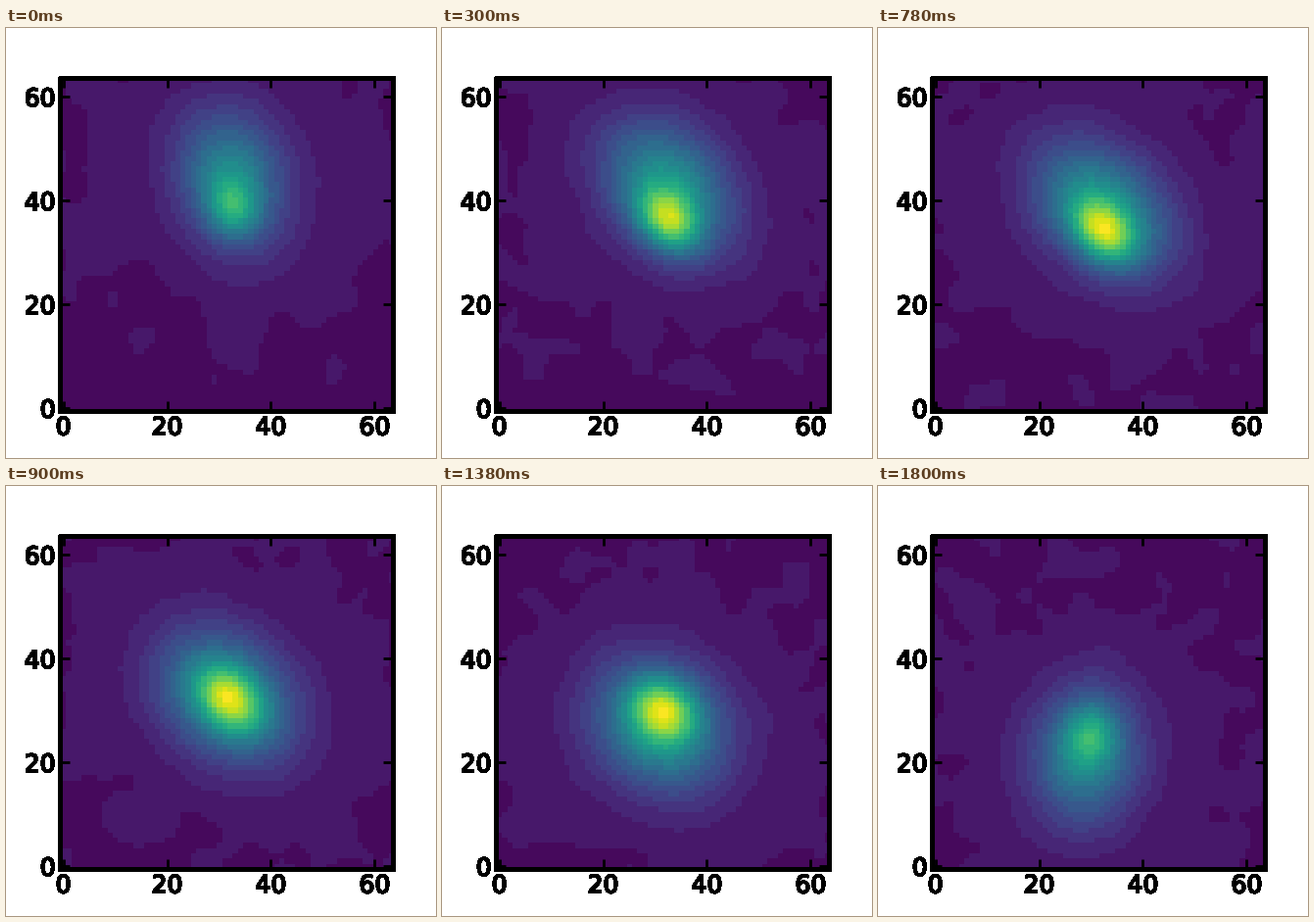
A matplotlib script for the animation above (2100 ms loop, 439x439 px).

```python
import numpy as np
import matplotlib.pyplot as plt
from matplotlib.animation import FuncAnimation
from matplotlib.colors import ListedColormap
from matplotlib.patheffects import withStroke

SIZE = 439      # stage, px
N = 64          # cells per side
POSES = 7
HOLD = 300      # ms per pose
BANDS = 24      # colour steps

yy, xx = np.mgrid[0:N, 0:N].astype(float)


def gauss(x, y, cx, cy, sx, sy, rho):
    """Tilted Gaussian of height one."""
    u, v = (x - cx) / sx, (y - cy) / sy
    return np.exp(-(u * u - 2 * rho * u * v + v * v) / (2 * (1 - rho * rho)))


def smooth_noise(seed, size=2.0):
    """Correlated noise with unit spread."""
    rng = np.random.default_rng(seed)
    f = np.fft.fftfreq(N)
    blur = np.exp(-2 * (np.pi * size) ** 2 * (f[:, None] ** 2 + f[None, :] ** 2))
    noise = np.fft.ifft2(np.fft.fft2(rng.standard_normal((N, N))) * blur).real
    return (noise - noise.mean()) / noise.std()


def field(i):
    """A bright core sinks steadily while its halo swings from top to bottom."""
    fade = (2 * i / (POSES - 1) - 1) ** 4
    px, py = 32.5 - 0.1 * (i - 0.7) ** 2, 39 - 2.33 * i
    hx, hy = 32.5 - 0.1 * i ** 2, 32.7 + 11.3 * np.cos(np.pi * i / (POSES - 1))
    width, height = 20.4 - 4.4 * fade, 20.0
    tilt = -0.13 - 0.2 * np.cos(0.75 * (i - 2))
    peak, amp = 1 - 0.3 * fade, 0.48 - 0.07 * fade
    edge = np.sqrt(2 * np.log(amp / 0.037))

    def backdrop(x, y):
        halo = amp * gauss(x, y, hx, hy, width / edge, height / edge, tilt)
        haze = 0.02 * gauss(x, y, hx, hy, 21, 17, 0)
        return 0.037 + haze + halo

    # lean the core away from the halo so the sum peaks at (px, py)
    cx, cy = px + 0.08 * (px - hx), py + 0.08 * (py - hy)
    core = gauss(xx, yy, cx, cy, 0.2 * width, 0.2 * height, tilt)
    return (backdrop(xx, yy) + (peak - backdrop(px, py)) * core
            + 0.004 * smooth_noise(20 + i))


fields = [field(i) for i in range(POSES)]
cmap = ListedColormap(plt.get_cmap("viridis")(np.linspace(0.024, 0.995, BANDS)))

plt.rcParams.update({
    "font.family": "DejaVu Sans",
    "font.size": 18,
    "axes.linewidth": 3.6,
})
fig = plt.figure(figsize=(SIZE / 100 + 1e-4, SIZE / 100 + 1e-4), dpi=100)
ax = fig.add_axes([55.9 / SIZE, 48 / SIZE, 339.1 / SIZE, 339.1 / SIZE])
image = ax.imshow(fields[0], cmap=cmap, vmin=0, vmax=1.02,
                  origin="lower", interpolation="nearest")

for spine in ax.spines.values():
    spine.set_position(("outward", 0.3))
ax.set_xticks(range(0, N, 20))
ax.set_yticks(range(0, N, 20))
ax.tick_params(direction="in", length=7, width=2, top=True, right=True)

# heavy, hard-edged digits
for label in ax.get_xticklabels() + ax.get_yticklabels():
    label.set_antialiased(False)
    label.set_path_effects([withStroke(linewidth=0.7, foreground="black")])


def update(i):
    image.set_data(fields[i])
    return [image]


anim = FuncAnimation(fig, update, frames=POSES, interval=HOLD,
                     repeat=True, repeat_delay=0, blit=False)
plt.show()
```
